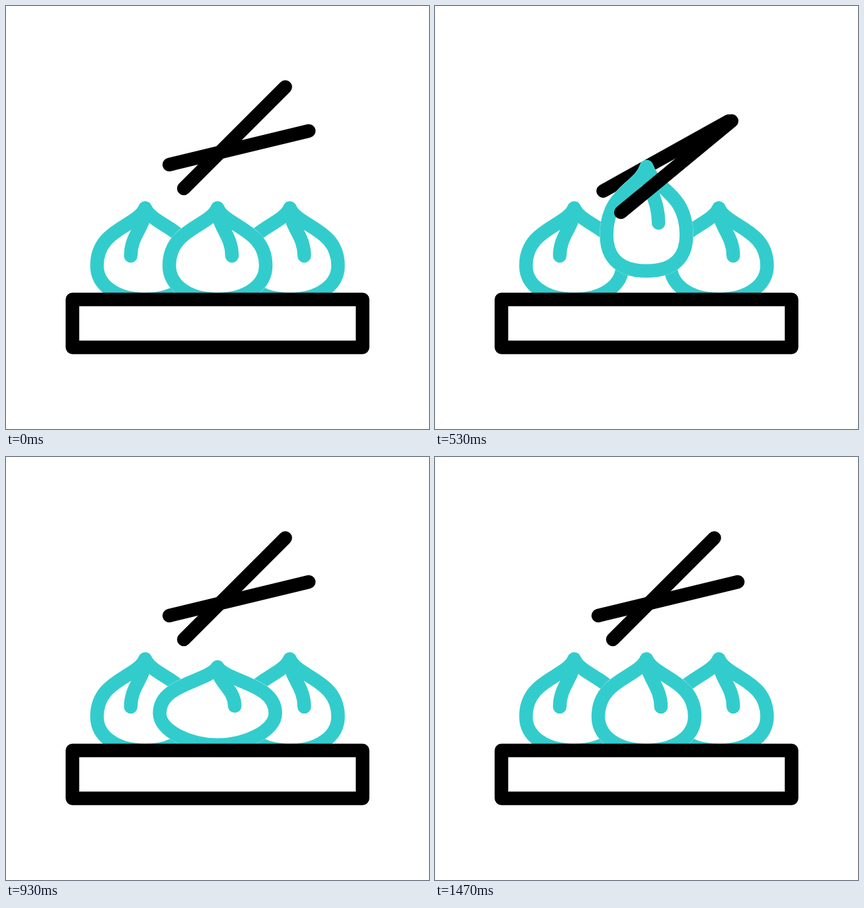
These frames come from a looping animation (640 px wide and 640 px high, 2000 ms). An HTML page:

```html
<!DOCTYPE html>
<html lang="en">
<head>
<meta charset="utf-8">
<title>Dumplings</title>
<style>
  html, body { margin: 0; width: 100%; height: 100%; overflow: hidden; background: #fff; }
  svg { display: block; width: 100%; height: 100%; }
  path, rect { fill: #fff; stroke: #000; stroke-width: 20.5; stroke-linecap: round; stroke-linejoin: round; }
  .bun { stroke: #3cc; }
  .crease { fill: none; stroke: #3cc; }
  .halo { stroke: #fff; stroke-width: 20.8; }
</style>
</head>
<body>
<svg viewBox="0 0 640 640">
  <g id="left" transform="translate(210.6 0) scale(-1 1)"><path class="bun"/><path class="crease"/></g>
  <g id="right" transform="translate(429.4 0)"><path class="bun"/><path class="crease"/></g>
  <path id="back"/>
  <g id="middle" transform="translate(320 0)"><path class="halo"/><path class="bun"/><path class="crease"/></g>
  <rect x="100.5" y="444" width="439" height="72.6"/>
  <path id="far"/>
  <path id="near"/>
</svg>
<script>
const LOOP = 2000, STICK = 217.2;
const $ = id => document.getElementById(id);

// Bun: time, tip y, half width, height
const REST = [305.7, 73, 138.3];
const bunKeys = [
  [0, ...REST],
  [235, ...REST],
  [370, 295.5, 67.5, 146.3],  // squeezed
  [530, 243.6, 60.4, 157.4],  // lifted
  [630, 225, 59.5, 158],
  [830, 299.5, 77.7, 124.2],  // dropped
  [940, 318, 87.7, 118],
  [1070, 288.5, 82, 125.6],   // bouncing
  [1230, 262.5, 76, 134.5],
  [1470, ...REST]
];

// Sticks: time, then lower end x, y and slant in degrees for far and near
const OPEN = [247, 240, 13.6, 269, 276, 45];
const stickKeys = [
  [0, ...OPEN],
  [170, 277, 318.5, 28, 276, 319, 36.3],
  [370, 269.5, 320, 24.9, 307, 361.3, 46.4],
  [530, 254.5, 280, 29.1, 281.3, 312.3, 39.5],
  [830, 249.7, 249, 18.5, 264, 272.7, 42],
  [920, ...OPEN]
];

// Slope through key i: flat at the ends and at turning points
function slope(keys, i, c) {
  const a = keys[i - 1], b = keys[i], d = keys[i + 1];
  if (!a || !d) return 0;
  const m = (b[c] - a[c]) / (b[0] - a[0]), n = (d[c] - b[c]) / (d[0] - b[0]);
  return m * n <= 0 ? 0 : 2 * m * n / (m + n);
}

// Smooth curve through the keys
function sample(keys, t) {
  const last = keys[keys.length - 1];
  if (t >= last[0]) return last.slice(1);
  const i = keys.findIndex(k => k[0] > t) - 1;
  const a = keys[i], b = keys[i + 1], span = b[0] - a[0], u = (t - a[0]) / span;
  const ease = u * u * (3 - 2 * u);
  return a.slice(1).map((v, k) => {
    const c = k + 1;
    return v + (b[c] - v) * ease + span * u * (1 - u) *
      ((1 - u) * slope(keys, i, c) - u * slope(keys, i + 1, c));
  });
}

const set = (el, d) => el.setAttribute('d', d);

// A taller bun has higher shoulders, a squarer base and a longer, steeper crease
function drawBun(group, [tip, w, h]) {
  const side = 0.85 * h - 30.5, y = tip + side, base = tip + h;
  const neck = tip + side * 0.33, shoulder = tip + side * 0.36;
  const belly = y + (h - side) * 0.56, foot = w * (0.62 + (73 - w) * 0.01);
  const outline = `M0 ${tip}C${w * 0.18} ${neck} ${w} ${shoulder} ${w} ${y}` +
    `C${w} ${belly} ${foot} ${base} 0 ${base}` +
    `C${-foot} ${base} ${-w} ${belly} ${-w} ${y}` +
    `C${-w} ${shoulder} ${-w * 0.18} ${neck} 0 ${tip}Z`;
  const cx = 0.29 * w + 0.7, cy = 0.66 * h - 19;
  const crease = `M0 ${tip}c0 ${cy * 0.4} ${cx} ${cy * 0.56} ${cx} ${cy}`;
  for (const el of group.children) set(el, el.matches('.crease') ? crease : outline);
}

function stick(x, y, slant) {
  const a = slant * Math.PI / 180;
  return `M${x} ${y}l${STICK * Math.cos(a)} ${-STICK * Math.sin(a)}`;
}

function draw(t) {
  drawBun($('middle'), sample(bunKeys, t));
  const s = sample(stickKeys, t), far = stick(...s.slice(0, 3));
  // The far stick slips behind the bun while it is held
  const held = t >= 200 && t < 830;
  set($('back'), held ? far : '');
  set($('far'), held ? '' : far);
  set($('near'), stick(...s.slice(3)));
}

drawBun($('left'), REST);
drawBun($('right'), REST);

const start = performance.now();
function tick() {
  draw((performance.now() - start) % LOOP);
  requestAnimationFrame(tick);
}
tick();
</script>
</body>
</html>
```
